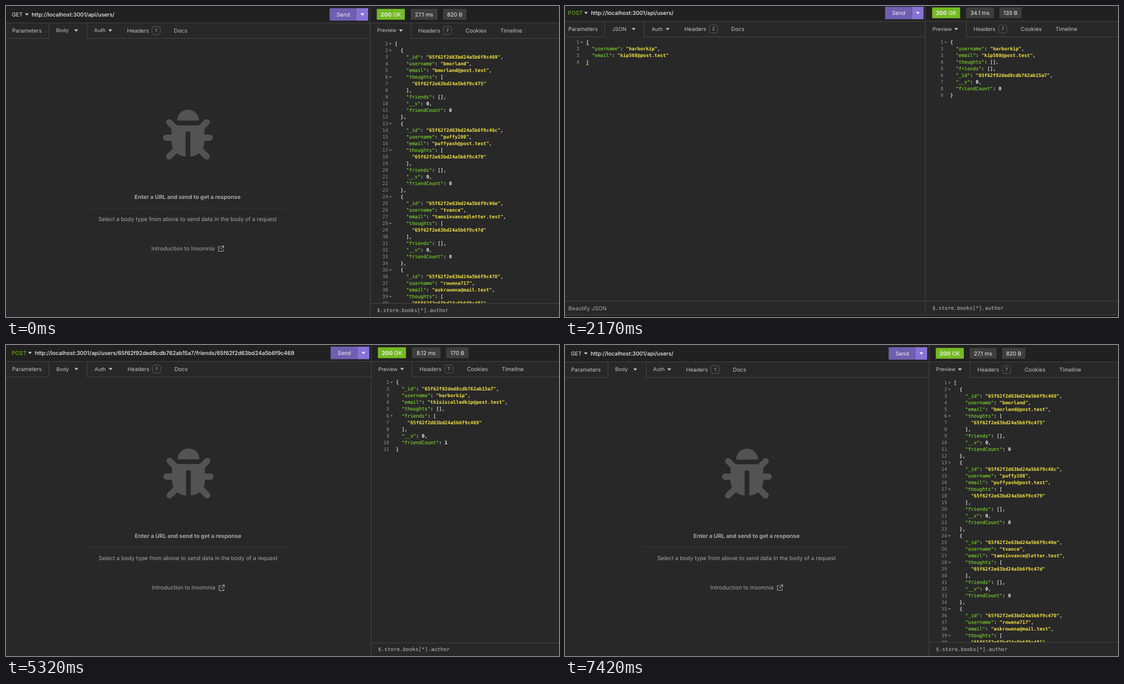
These frames come from a looping animation (997x561 px, 7.49 s). An HTML page:

```html
<!DOCTYPE html>
<html lang="en">
<head>
<meta charset="utf-8">
<title>REST client walkthrough</title>
<style>
html, body { margin: 0; width: 100%; height: 100%; overflow: hidden; background: #282828; }
svg { display: block; width: 997px; height: 561px; }
text { font: 9.9px Inter, sans-serif; fill: #c2c2c2; white-space: pre; text-rendering: geometricPrecision; }
.bright { fill: #ececec; }
.url { fill: #f0f0f0; font-weight: 500; }
.post { fill: #75ba24; }
.put { fill: #e08a2c; }
.delete { fill: #d9504c; }
.mid { text-anchor: middle; }
.menu { font-size: 9.3px; }
.hint { fill: #a5a5a5; font-size: 10px; }
.title { fill: #a5a5a5; font-size: 10.1px; font-weight: 700; }
.badge { font-size: 8px; text-anchor: middle; }
.code, .num, .filter { font: 8.55px "DejaVu Sans Mono", monospace; fill: #eee; }
.code { stroke: #eee; stroke-width: .2px; }
.num { fill: #8f8f8f; text-anchor: end; }
.filter { font-size: 9.3px; fill: #bdbdbd; }
.key { fill: #78cc2e; stroke: #78cc2e; }
.str { fill: #f2e245; font-weight: 700; stroke: none; }
.val { fill: #f6f6f6; font-weight: 700; stroke: none; }
.faint { fill: #8f8f8f; stroke: none; }
.line { fill: #454545; shape-rendering: crispEdges; }
.step { animation: show 7490ms step-end infinite; }
@keyframes show {
  0% { visibility: visible; }
  14.01869%, 100% { visibility: hidden; }
}
</style>
</head>
<body>
<svg id="stage" viewBox="0 0 997 561"></svg>
<script>
const LOOP = 7490, FIRST = 1120, STEP = 1050;
const UI = 9.9, CHAR = 5.15, ROW = 12;

const user = (_id, username, email, thoughts = [], friends = []) =>
  ({ _id, username, email, thoughts, friends, __v: 0, friendCount: friends.length });

const ids = {
  ann: '65f62f2d63bd24a5b6f9c469', puffy: '65f62f2d63bd24a5b6f9c46c',
  tam: '65f62f2e63bd24a5b6f9c46e', row: '65f62f2e63bd24a5b6f9c470',
  kip: '65f62f92ded8cdb762ab15a7'
};
const thought = end => ['65f62f2e63bd24a5b6f9c4' + end];
const puffy = user(ids.puffy, 'puffy208', 'puffyash@post.test', thought('79'));
const tam = user(ids.tam, 'tvance', 'tamsinvance@letter.test', thought('7d'));
const all = [
  user(ids.ann, 'bmorland', 'bmorland@post.test', thought('75')),
  puffy, tam,
  user(ids.row, 'rowena717', 'askrowena@mail.test', thought('81'))
];
const { __v, ...single } = tam;
const draft = { username: 'harborkip', email: 'kip508@post.test' };
const edit = { username: 'harborkip', email: 'thisiscalledkip@post.test' };
const created = { ...draft, thoughts: [], friends: [], _id: ids.kip, __v: 0, friendCount: 0 };
const kip = friends => user(ids.kip, edit.username, edit.email, [], friends);
const friendPath = ids.kip + '/friends/' + ids.ann;

// view: scale, x, y; sizes: widths of the time and size chips
const steps = [
  { method: 'GET', path: '', time: '27.1 ms', size: '820 B', sizes: [48.5, 42], reply: all, view: [1, 0, 0] },
  { method: 'GET', path: ids.tam, time: '18 ms', size: '157 B', sizes: [42.5, 39], reply: single, view: [1.004, -1.5, -1.4] },
  { method: 'POST', path: '', time: '34.1 ms', size: '135 B', sizes: [50.5, 40], reply: created, body: draft, view: [.9977, -5, -2.6] },
  { method: 'PUT', path: ids.kip, time: '9.24 ms', size: '144 B', sizes: [51.5, 40.5], reply: kip([]), body: edit, view: [1, -3, -3] },
  { method: 'DELETE', path: ids.puffy, time: '8.67 ms', size: '162 B', sizes: [51.5, 40.5], reply: puffy, body: '...', view: [1.05, .9, -.3] },
  { method: 'POST', path: friendPath, time: '8.12 ms', size: '170 B', sizes: [51.5, 40.5], reply: kip([ids.ann]), view: [1.003, 0, -1] },
  { method: 'DELETE', path: friendPath, time: '6.58 ms', size: '144 B', sizes: [51.5, 40.5], reply: kip([]), view: [1.0065, 1.6, -1] }
];
const methodEnd = { GET: 37.5, PUT: 37.5, POST: 43, DELETE: 53.5 };

const rect = (x, y, w, h, fill) => `<rect x="${x}" y="${y}" width="${w}" height="${h}" fill="${fill}"/>`;
const hline = (x, y, end) => `<rect class="line" x="${x}" y="${y}" width="${end - x}" height="1"/>`;
const vline = (x, y, end) => `<rect class="line" x="${x}" y="${y}" width="1" height="${end - y}"/>`;
// y is the middle of the capitals
const text = (x, y, str, cls = '', size = UI) =>
  `<text x="${x}" y="${y + size * .364}" class="${cls}">${str}</text>`;
const caret = (x, y, w = 7, fill = '#c4c4c4') =>
  `<path d="M${x - w / 2} ${y - w * .28}h${w}l${-w / 2} ${w * .58}z" fill="${fill}"/>`;
const menu = (x, label, arrow) => text(x, 44, label, 'menu', 9.3) + caret(arrow, 44.3);
const badge = (x, n) =>
  `<rect x="${x - 7.5}" y="37" width="15" height="14.5" rx="4" fill="none" stroke="#5a5a5a"/>` +
  text(x, 44.2, n, 'badge', 8);

function paint(line) {
  return line.replace(/("[^"]*")(:?)|\d+/g, (all, str, colon) =>
    !str ? `<tspan class="val">${all}</tspan>`
      : `<tspan class="${colon ? 'key' : 'str'}">${str}</tspan>${colon}`);
}

function code(data, x, marked) {
  const lines = JSON.stringify(data, null, 2).split('\n').slice(0, 40);
  return lines.map((line, i) => {
    const y = 68 + i * ROW, str = line.trim();
    const left = x + (line.length - str.length) * CHAR;
    const edge = marked && (i === 0 || i === lines.length - 1);
    return text(x - 12.2, y, i + 1, 'num', 8.55) +
      (/[[{]$/.test(str) ? caret(x - 8, y + .5, 5, '#777') : '') +
      text(left, y, paint(str), 'code', 8.55) +
      (edge ? rect(left, y + 4.5, CHAR, 1, '#75ba24') : '');
  }).join('');
}

const bug = `<g transform="translate(283 187) scale(.1758)" fill="#535353">
  <path d="M145 112a112 112 0 0 1 224 0z"/>
  <path d="M88 160H424V336A146 146 0 0 1 280 480V236a12 12 0 0 0-12-12h-24a12 12 0 0 0-12 12V480A146 146 0 0 1 88 336z"/>
  <path d="M32 288h88M392 288h88M64 128l56 56M448 128l-56 56M64 480l66-66M448 480l-66-66"
    fill="none" stroke="#535353" stroke-width="64" stroke-linecap="round"/></g>`;

const emptyBody = bug +
  text(327.3, 344.5, 'Enter a URL and send to get a response', 'mid title') +
  rect(140, 364, 372, 1, '#383838') +
  text(327.3, 384.3, 'Select a body type from above to send data in the body of a request', 'mid hint') +
  text(262, 437.5, 'Introduction to Insomnia', 'hint') +
  `<path d="M387 434h-4v8.500h8.500v-4M388.500 432.800h4v4M392.300 433l-5.500 5.500" fill="none" stroke="#a5a5a5" stroke-width="1.1"/>`;

function leftPane({ method, path, body }) {
  const end = methodEnd[method], shift = body ? 2.5 : 0, tab = 146 + shift / 2;
  let out = text(10.4, 15, method, method === 'GET' ? 'bright' : method.toLowerCase()) +
    caret(end, 15.3, 6.5, '#dcdcdc') +
    text(end + 8.8, 15, 'http://localhost:3001/api/users/' + path, 'url') +
    rect(583.5, 4, 48.5, 22.5, '#705fb0') + rect(632, 4, 21, 22.5, '#8773d8') +
    text(608, 15, 'Send', 'mid bright') + caret(642.5, 15.3, 7, '#f0f0f0') +
    text(11, 44, 'Parameters') +
    menu(90.5, body ? 'JSON' : 'Body', 126.5 + shift) +
    menu(159 + shift, 'Auth', 188 + shift) +
    text(218.3 + shift, 44, 'Headers') + badge(270.7 + shift, body ? 2 : 1) +
    text(302.8 + shift, 44, 'Docs') +
    vline(76.5, 30, 58) + vline(tab, 30, 58) +
    hline(-20, 58, 77) + hline(tab, 58, 656);
  if (!body) return out + emptyBody;
  out += body === '...'
    ? text(31.2, 68, 1, 'num', 8.55) + text(43.5, 68, '<tspan class="faint">...</tspan>', 'code', 8.55)
    : code(body, 43.2, true);
  return out + hline(-20, 536, 656) + text(11, 548.8, 'Beautify JSON', 'hint');
}

function rightPane({ time, size, sizes: [tw, sw], reply }) {
  const sizeX = 739.5 + tw;
  return rect(668.5, 5.2, 50.5, 19.5, '#75ba24') +
    text(693.8, 15, '<tspan font-weight="700">200</tspan> <tspan font-weight="500">OK</tspan>', 'mid bright') +
    rect(729.5, 5.2, tw, 19.5, '#3e3e3e') + text(729.5 + tw / 2, 15, time, 'mid bright') +
    rect(sizeX, 5.2, sw, 19.5, '#3e3e3e') + text(sizeX + sw / 2, 15, size, 'mid bright') +
    menu(669, 'Preview', 712) +
    text(743.3, 44, 'Headers') + badge(796, 7) +
    text(828.5, 44, 'Cookies') + text(891, 44, 'Timeline') +
    vline(730, 30, 58) + hline(730, 58, 1020) +
    code(reply, 701, false) +
    rect(657, 536, 360, 25, '#282828') + hline(656, 536, 1020) +
    text(668.8, 548.3, '$.store.books[*].author', 'filter', 9.3);
}

function scene(step, i) {
  const [k, x, y] = step.view;
  const timing = i ? ` class="step" style="animation-delay:${FIRST + (i - 1) * STEP - LOOP}ms"` : '';
  return `<g${timing}>${rect(0, 0, 997, 561, '#282828')}
    <g transform="translate(${x} ${y}) scale(${k})">
    ${rect(-20, -20, 1060, 50, '#212121')}${leftPane(step)}${rightPane(step)}
    ${hline(-20, 30, 1020)}${vline(656, -20, 561)}
    ${hline(-20, 561, 1020)}${rect(-20, 562, 1060, 20, '#1e1e1e')}</g></g>`;
}

document.getElementById('stage').innerHTML = steps.map(scene).join('');
</script>
</body>
</html>
```
